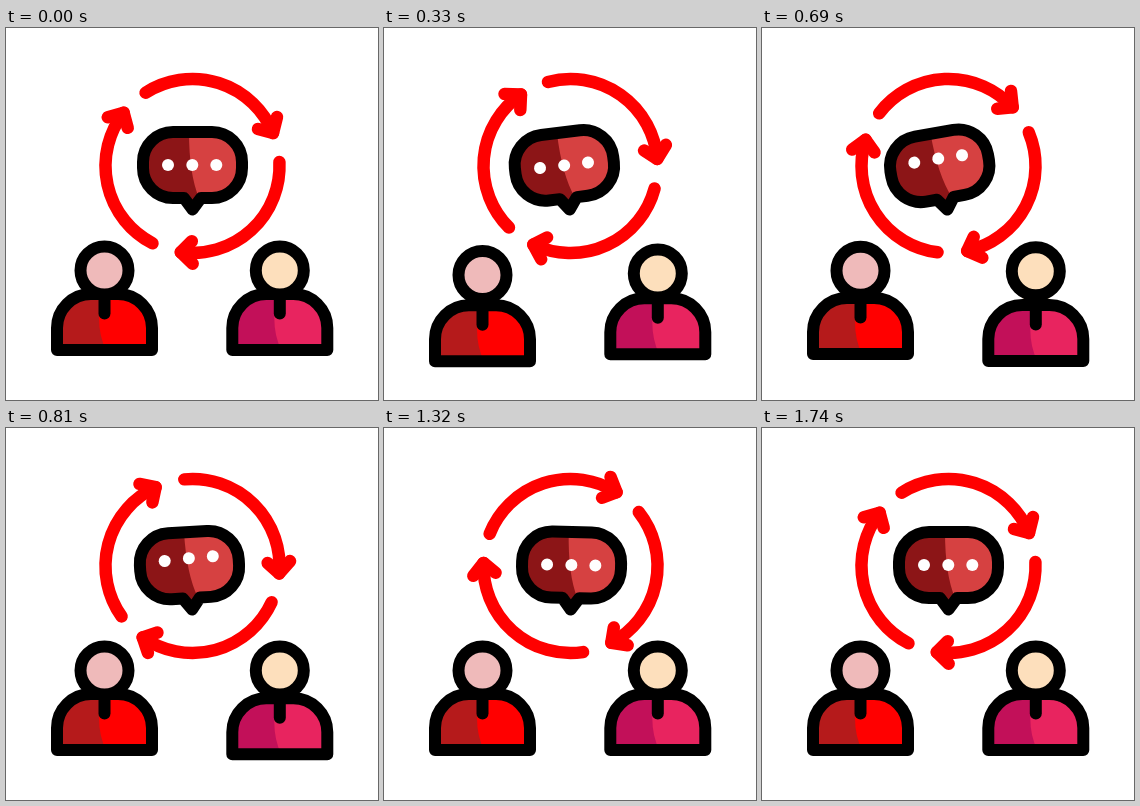
Animation of 372x372 px, one loop 1800 ms. Source, as an HTML page:

```html
<!DOCTYPE html>
<html>
<head>
<meta charset="utf-8">
<style>
  html, body { margin: 0; width: 100%; height: 100%; overflow: hidden; background: #fff; }
  svg { display: block; width: 100vw; height: 100vh; }
  .line { fill: none; stroke: #000; stroke-width: 12; stroke-linecap: round; stroke-linejoin: round; }
  .red { stroke: #f00; stroke-width: 12.5; }
</style>
</head>
<body>
<svg viewBox="0 0 372 372">
  <defs>
    <g id="arrow" class="line red">
      <path d="M139.6 64.7A87 87 0 0 1 267 105"/>
      <path d="M252 101L267 105L271 89"/>
    </g>
    <path id="torso" d="M51 322V300a34 34 0 0 1 34-34h27a34 34 0 0 1 34 34V322Z"/>
    <path id="shade" d="M51 322V300a34 34 0 0 1 34-34H93V290Q93 308 100 322Z"/>
    <path id="balloon" d="M167 104H206a30 30 0 0 1 30 30V140a30 30 0 0 1-30 30H195L186.5 181.5L178 170H167a30 30 0 0 1-30-30V134a30 30 0 0 1 30-30Z"/>
  </defs>

  <g id="ring">
    <use href="#arrow"/>
    <use href="#arrow" transform="rotate(120 186.5 138)"/>
    <use href="#arrow" transform="rotate(240 186.5 138)"/>
  </g>

  <g id="bubble">
    <use href="#balloon" fill="#d64141"/>
    <path fill="#8c1517" d="M183 104H167a30 30 0 0 0-30 30V140a30 30 0 0 0 30 30H178L186.5 181L193 170Q183 146 183 104Z"/>
    <use href="#balloon" class="line"/>
    <g fill="#fff">
      <circle class="dot" cx="162" cy="137" r="6"/>
      <circle class="dot" cx="186.3" cy="137" r="6"/>
      <circle class="dot" cx="210.3" cy="137" r="6"/>
    </g>
  </g>
  <g id="people"></g>
</svg>
<script>
const LOOP = 1800, STEP = 30, SPAN = 1770;
const $ = id => document.getElementById(id);

const people = [
  { x: 0, skin: '#efbaba', dark: '#b51a1b', light: '#f00', bodyPeak: 445, headPeak: 360, nod: 4.5 },
  { x: 175.3, skin: '#fddfbc', dark: '#c21059', light: '#e8245f', bodyPeak: 570, headPeak: 425, nod: 3.5 }
];

$('people').innerHTML = people.map(p => `
  <g transform="translate(${p.x})">
    <ellipse class="neck" cx="98.5" cy="267.5" rx="14" ry="8" fill="${p.skin}"/>
    <g class="body">
      <use href="#torso" fill="${p.light}"/>
      <use href="#shade" fill="${p.dark}"/>
      <use href="#torso" class="line"/>
      <path class="line" d="M98.5 268V285.5"/>
    </g>
    <circle class="line head" cx="98.5" cy="242.5" r="24" style="fill:${p.skin}"/>
  </g>`).join('');

const all = name => [...document.querySelectorAll('.' + name)];
const heads = all('head'), necks = all('neck'), bodies = all('body'), dots = all('dot');
const shift = (el, y) => el.setAttribute('transform', `translate(0 ${y})`);
const smooth = p => p * p * (3 - 2 * p);

// Bell-shaped pulse, 1 at its peak and 0 outside its width
function pulse(t, peak, width) {
  const d = Math.abs(t - peak) / width;
  return d < 0.5 ? Math.cos(Math.PI * d) ** 2 : 0;
}

// Cubic Bezier easing (a, 0, 1 - a, 1), solved by bisection
function ease(x, a = 0.54) {
  let lo = 0, hi = 1;
  for (let i = 0; i < 24; i++) {
    const s = (lo + hi) / 2, r = 1 - s;
    if (3 * a * s * r * r + 3 * (1 - a) * s * s * r + s ** 3 < x) lo = s; else hi = s;
  }
  return smooth(lo);
}

const sway = [[0, 0], [600, -12], [1000, 4], [1500, 0], [LOOP, 0]];
function tilt(t) {
  const i = sway.findIndex(k => t < k[0]);
  const [t0, a] = sway[i - 1], [t1, b] = sway[i];
  return a + (b - a) * smooth((t - t0) / (t1 - t0));
}

function draw(now) {
  let t = Math.floor((now % LOOP) / STEP) * STEP;
  if (t < 60) t = 0;
  if (t >= 1740) t = SPAN;
  $('ring').setAttribute('transform', `rotate(${360 * ease(t / SPAN)} 186.5 138)`);
  $('bubble').setAttribute('transform', `rotate(${tilt(t)} 186.5 188)`);
  dots.forEach((d, i) => shift(d, -7.5 * pulse(t, 675 + 55 * i, 800)));
  people.forEach((p, i) => {
    const nod = p.nod * pulse(t, p.headPeak, 760);
    shift(heads[i], nod);
    shift(necks[i], nod);
    shift(bodies[i], 14.3 * pulse(t, p.bodyPeak, 760));
  });
}

const start = performance.now();
function frame() {
  draw(performance.now() - start);
  requestAnimationFrame(frame);
}
frame();
</script>
</body>
</html>
```
